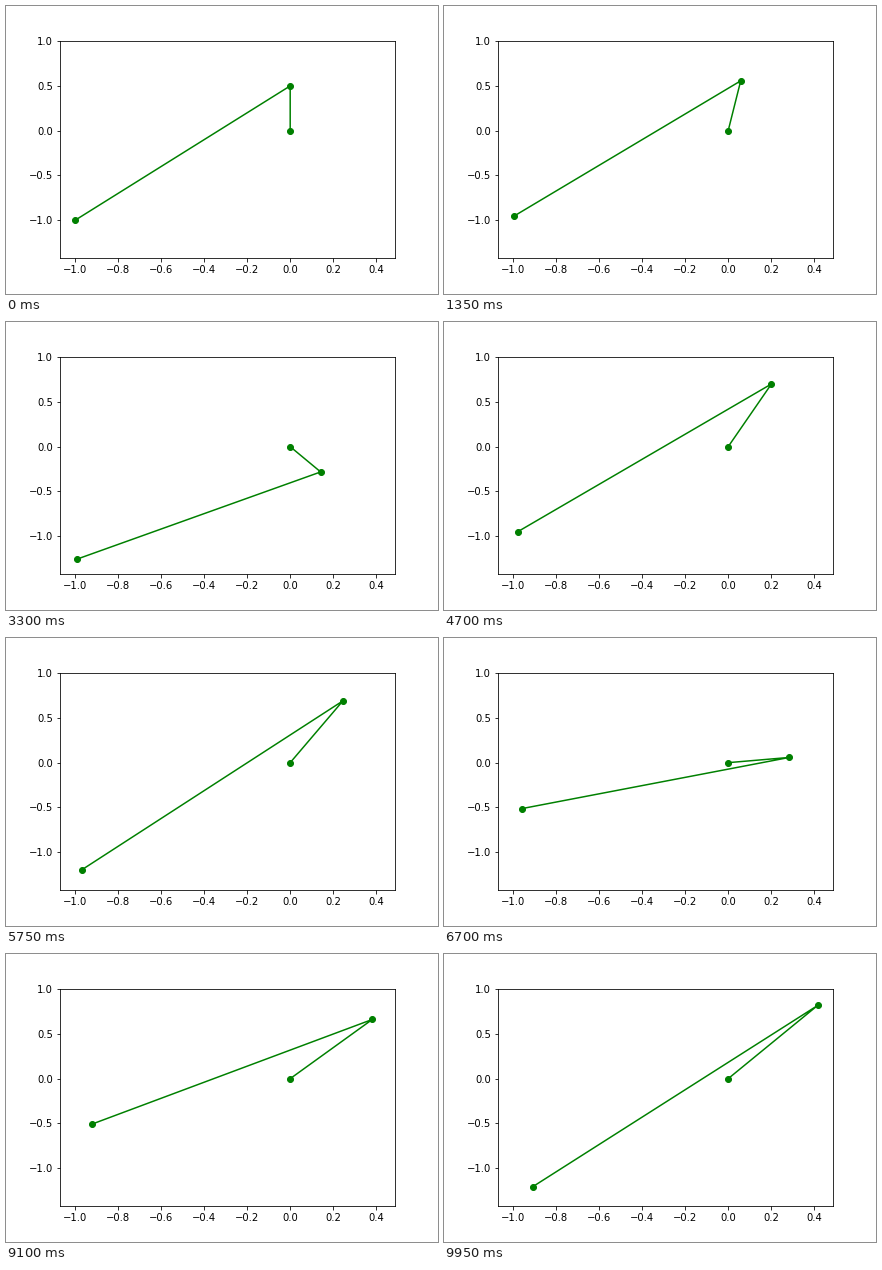
These frames come from a looping animation (432x288 px, 10 s). A matplotlib script:

```python
import numpy as np
import matplotlib.pyplot as plt
from matplotlib.animation import FuncAnimation

FRAMES, INTERVAL = 200, 50      # count, milliseconds
SPIN = 0.0431                   # steady turn of the pivot, rad/s
LENGTH = 0.5                    # swinging arm, the pivot arm is 1
PULL, PUSH = 3.746, 2.164       # pull towards upright, starting speed
SUBSTEPS = 20


def swing_angles():
    """Angle of the swinging arm from upright, one value per frame."""
    angle, speed = np.pi / 2, PUSH
    h = INTERVAL / 1000 / SUBSTEPS
    angles = []
    for _ in range(FRAMES):
        angles.append(angle)
        for _ in range(SUBSTEPS):
            speed -= PULL * np.sin(angle) * h / 2
            angle += speed * h
            speed -= PULL * np.sin(angle) * h / 2
    return np.array(angles)


def padded(values, margin=0.05):
    low, high = np.min(values), np.max(values)
    pad = margin * (high - low)
    return low - pad, high + pad


turn = SPIN * np.arange(FRAMES) * INTERVAL / 1000
swing = swing_angles()
zero = np.zeros(FRAMES)
xs = np.column_stack([zero, np.sin(turn), -np.cos(turn)])
ys = np.column_stack([zero,
                      xs[:, 1] + LENGTH * np.sin(swing),
                      xs[:, 2] + LENGTH * np.cos(swing)])

plt.rcParams.update({"font.family": "DejaVu Sans", "font.size": 10})
fig = plt.figure(figsize=(6, 4), dpi=72, facecolor="white")
fig.subplots_adjust(left=0.125, right=0.9, bottom=0.125, top=0.88)
ax = fig.add_subplot()
ax.set_xticks(np.arange(-10, 5, 2) / 10)
ax.set_yticks(np.arange(-2, 3) / 2)
ax.set_xlim(padded(xs))
ax.set_ylim(padded(ys))
line, = ax.plot([], [], "go-", lw=1.5, ms=6)


def draw(i):
    line.set_data(xs[i], ys[i])
    return line,


anim = FuncAnimation(fig, draw, frames=FRAMES, interval=INTERVAL,
                     repeat=True, repeat_delay=0)
plt.show()
```
